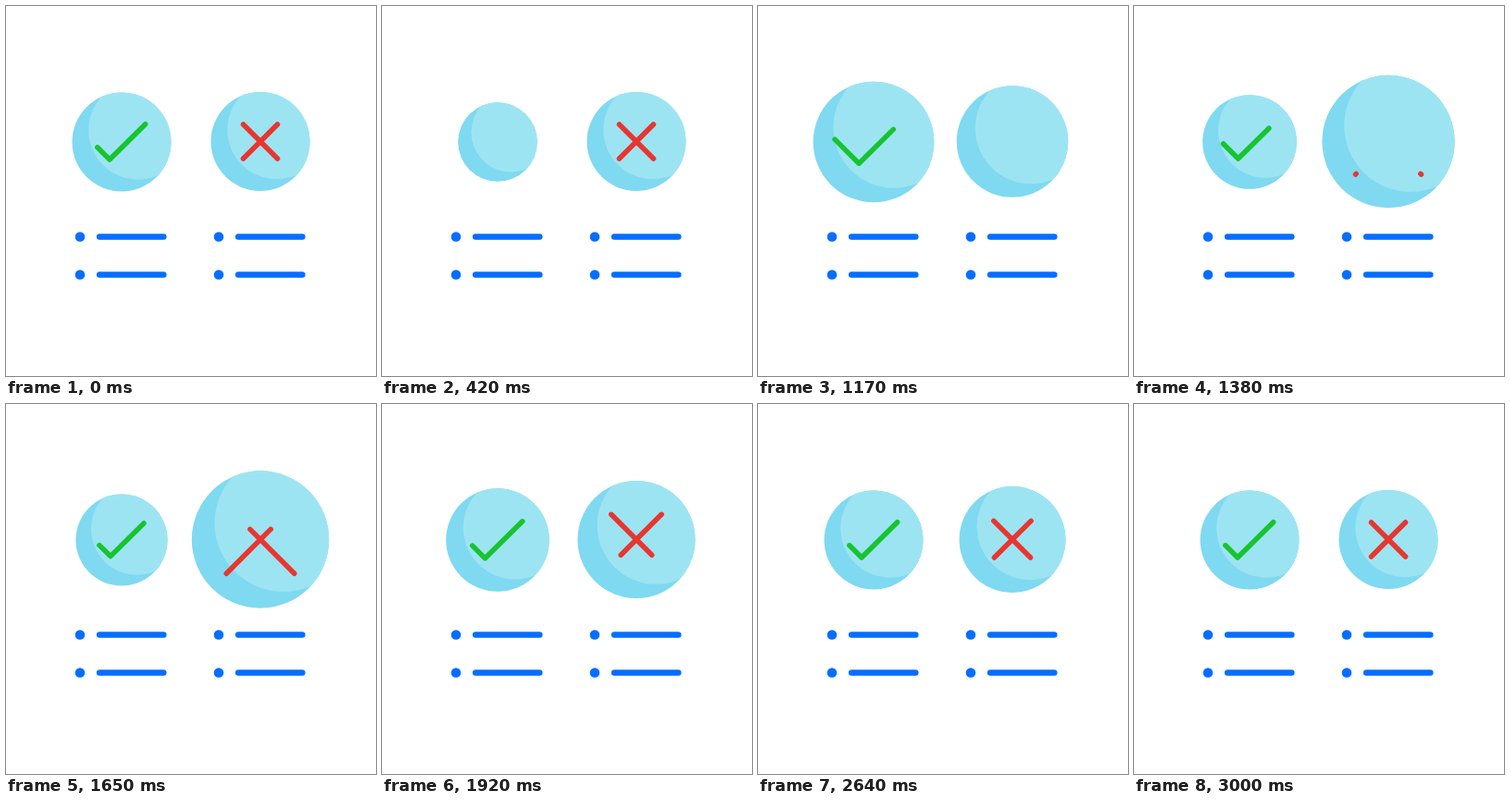
Animation of 400 by 400 pixels, one loop 5.09 s. Source, as an HTML page with a canvas:

```html
<!DOCTYPE html>
<html lang="en">
<head>
<meta charset="utf-8">
<title>Yes and no lists</title>
<style>
html, body { margin: 0; width: 100%; height: 100%; overflow: hidden; background: #fff; }
canvas { display: block; width: 400px; height: 400px; }
</style>
</head>
<body>
<canvas id="stage" width="400" height="400"></canvas>
<script>
const ctx = document.getElementById('stage').getContext('2d');
const LOOP = 5090, STEP = 30, REST = 53.5;

const swing = x => (1 - Math.cos(Math.PI * x)) / 2;
const sink = x => x ** 1.4;
const spring = x => 1 - (1 - x) ** 2.4;

// Keys are [time, value, easing towards this value].
function valueAt(keys, t) {
  if (t <= keys[0][0]) return keys[0][1];
  for (let i = 1; i < keys.length; i++) {
    const [t0, v0] = keys[i - 1], [t1, v1, ease = swing] = keys[i];
    if (t < t1) return v0 + (v1 - v0) * ease((t - t0) / (t1 - t0));
  }
  return keys[keys.length - 1][1];
}

// A stroke of fixed length slides along each path; `lead` is its front end.
const badges = [
  {
    x: 125, y: 147, color: '#17c42f',
    paths: [[[36.5, -30], [-13, 19], [-39, -7]]],
    start: 0, dip: 420, tail: 15.2, end: 88.3,
    radius: [[0, REST], [420, 42.8, sink], [900, 78, spring], [1500, 48], [2050, 57], [2400, REST]],
    lead: [[680, 0], [1140, 100], [1600, 88], [2100, 88.3]]
  },
  {
    x: 275, y: 146.5, color: '#e8362f',
    paths: [[[26.5, 26.5], [-26.5, -26.5]], [[-26.5, 26.5], [26.5, -26.5]]],
    start: 510, dip: 1000, tail: 11.3, end: 63.6,
    radius: [[510, REST], [1000, 42.8, sink], [1600, 74.5, spring], [2270, 51], [2660, 57.5], [3000, REST]],
    lead: [[1350, 0], [1830, 70.7], [2300, 61], [2700, 64.2], [3000, 63.6]]
  }
];

function disc(x, y, r, color) {
  ctx.fillStyle = color;
  ctx.beginPath();
  ctx.arc(x, y, r, 0, 2 * Math.PI);
  ctx.fill();
}

function line(points, color, width) {
  ctx.strokeStyle = color;
  ctx.lineWidth = width;
  ctx.beginPath();
  points.forEach(([x, y]) => ctx.lineTo(x, y));
  ctx.stroke();
}

function drawBall(x, y, r) {
  disc(x, y, r, '#7fd9f0');
  ctx.save();
  ctx.clip();
  disc(x + r * 0.333, y - r * 0.24, r, '#9de4f3');
  ctx.restore();
}

function markRange(b, t) {
  if (t >= b.dip) {
    const lead = valueAt(b.lead, t);
    return [Math.max(0, lead - (b.end - b.tail)), lead];
  }
  return [b.tail, valueAt([[b.start, b.end], [b.dip, b.tail, sink]], t)];
}

function drawBadge(b, t) {
  const r = valueAt(b.radius, t), k = r / REST;
  drawBall(b.x, b.y, r);
  const [from, to] = markRange(b, t);
  if (to - from < 0.1) return;
  ctx.setLineDash([(to - from) * k, 1000]);
  ctx.lineDashOffset = -from * k;
  for (const path of b.paths) {
    line(path.map(([x, y]) => [b.x + x * k, b.y + y * k]), b.color, 5.5);
  }
  ctx.setLineDash([]);
}

function drawList(x) {
  for (const y of [249.5, 290.5]) {
    disc(x, y, 5.3, '#066eff');
    line([[x + 21.2, y], [x + 90.3, y]], '#066eff', 6.6);
  }
}

function frame(now) {
  const t = Math.floor((now % LOOP) / STEP) * STEP;
  ctx.fillStyle = '#fff';
  ctx.fillRect(0, 0, 400, 400);
  ctx.lineCap = ctx.lineJoin = 'round';
  badges.forEach(b => drawBadge(b, t));
  [80, 230].forEach(drawList);
  requestAnimationFrame(frame);
}

const origin = performance.now();
(function tick() { frame(0); })();
function frameClock() { return performance.now() - origin; }
</script>
</body>
</html>
```
